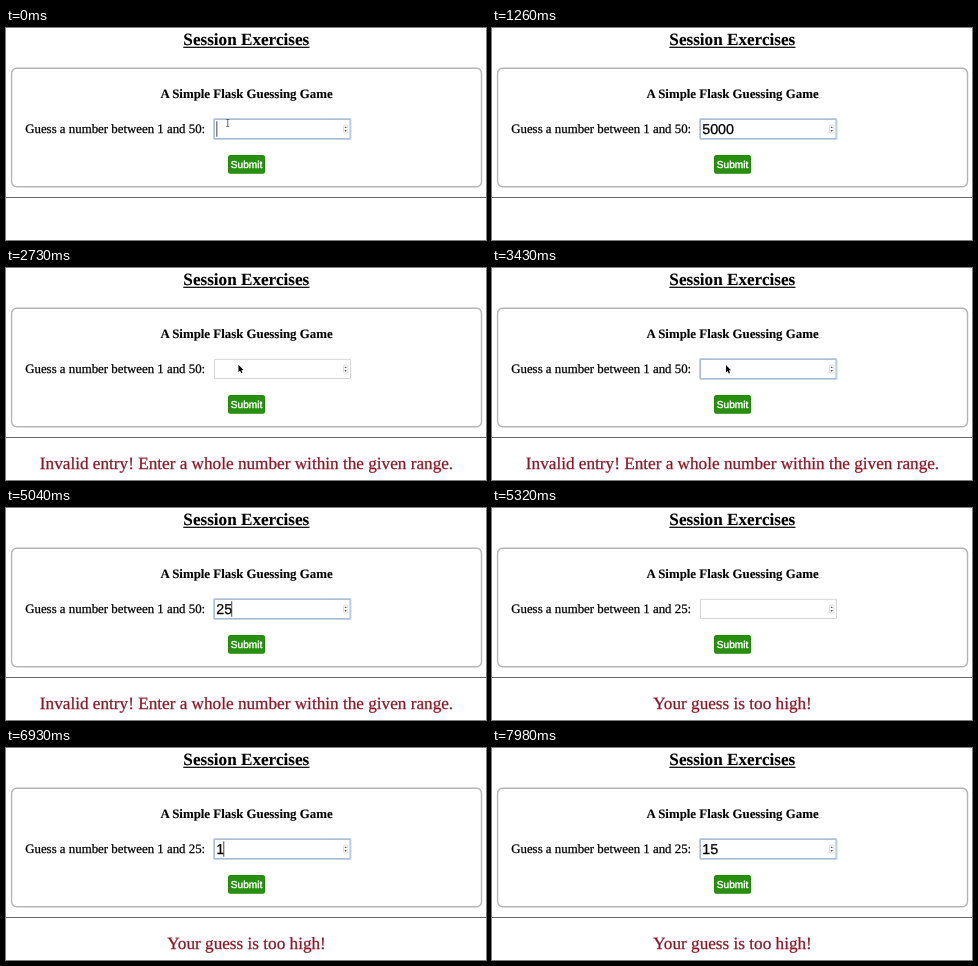
An HTML page with a canvas that plays this animation: 480 by 212 pixels, repeating every 8000 ms.

```html
<!DOCTYPE html>
<html lang="en">
<head>
<meta charset="utf-8">
<title>Guessing game</title>
<style>
html, body { margin: 0; width: 100%; height: 100%; overflow: hidden; background: #fff; }
canvas { display: block; width: 480px; height: 212px; }
</style>
</head>
<body>
<canvas id="stage"></canvas>
<script>
const LOOP = 8000;
const SERIF = '"Liberation Serif", "Times New Roman", serif';
const SANS = '"Liberation Sans", Arial, sans-serif';
const canvas = document.getElementById('stage');
const ctx = canvas.getContext('2d');
const ratio = window.devicePixelRatio || 1;
canvas.width = 480 * ratio;
canvas.height = 212 * ratio;
ctx.scale(ratio, ratio);
ctx.textRendering = 'geometricPrecision';
ctx.lineJoin = 'round';

// [start time, value]: the last entry already reached is in force
const typed = [[0, ''], [490, '5'], [700, '50'], [840, '500'], [980, '5000'], [1540, ''],
  [4620, '2'], [4830, '25'], [5320, ''], [6930, '1'], [7210, '15']];
const focus = [[0, 1], [1540, 0], [3360, 1], [5320, 0], [6440, 1]];
const caret = [[0, 1], [1050, 0], [3710, 1], [4200, 0], [4620, 1], [5320, 0],
  [6580, 1], [7140, 0], [7210, 1], [7770, 0]];
const message = [[0, ''], [1540, 'Invalid entry! Enter a whole number within the given range.'],
  [5320, 'Your guess is too high!']];
const limit = [[0, 50], [5320, 25]];
const pointer = [[0, 'beam'], [490, ''], [2240, 'arrow'], [3710, 'beam'], [4620, ''],
  [5810, 'arrow'], [6580, 'beam'], [6930, '']];

function at(track, t) {
  let value = track[0][1];
  for (const [start, v] of track) if (t >= start) value = v;
  return value;
}

// a hairline outline gives the letters a slightly heavier weight
function text(str, x, y, font, color, align = 'center', weight = 0.25) {
  ctx.font = font;
  ctx.fillStyle = ctx.strokeStyle = color;
  ctx.textAlign = align;
  ctx.lineWidth = weight;
  ctx.fillText(str, x, y);
  ctx.strokeText(str, x, y);
}

function box(x, y, w, h, r, stroke, fill, width = 1) {
  ctx.beginPath();
  ctx.roundRect(x, y, w, h, r);
  if (fill) { ctx.fillStyle = fill; ctx.fill(); }
  if (stroke) { ctx.strokeStyle = stroke; ctx.lineWidth = width; ctx.stroke(); }
}

function poly(points, color) {
  ctx.beginPath();
  points.forEach(([x, y]) => ctx.lineTo(x, y));
  ctx.closePath();
  ctx.fillStyle = color;
  ctx.fill();
}

function drawPage(t) {
  ctx.fillStyle = '#fff';
  ctx.fillRect(0, 0, 480, 212);
  text('Session Exercises', 240.3, 17, `bold 17.15px ${SERIF}`, '#000', 'center', 0.1);
  ctx.fillRect(177.3, 18.7, 126.2, 1.2);
  box(5.6, 40.3, 469.9, 118.5, 5, '#b4b4b4', null, 1.4);
  text('A Simple Flask Guessing Game', 240.5, 70.2, `bold 12.87px ${SERIF}`, '#000', 'center', 0.1);
  text(`Guess a number between 1 and ${at(limit, t)}:`, 19.2, 105.2, `12.87px ${SERIF}`, '#000', 'left');
  box(222, 127, 37, 18.7, 2.5, null, '#1f7d08');
  box(222.6, 127.6, 35.8, 17.5, 2, null, '#28900f');
  text('Submit', 240.5, 139.8, `10.1px ${SANS}`, '#fff', 'center', 0.4);
  ctx.fillStyle = '#666';
  ctx.fillRect(0, 169, 480, 1);
  text(at(message, t), 240.5, 201.3, `17.2px ${SERIF}`, '#8c1526');
}

function drawField(t) {
  if (at(focus, t)) {
    box(207.5, 90.5, 137.5, 21, 1, 'rgba(135,175,210,0.55)');
    box(208.5, 91.5, 135.5, 19, 0, 'rgba(125,155,185,0.65)');
  } else {
    box(208.5, 91.3, 136, 19.2, 0, '#d6d6d6');
  }
  box(337.4, 96.9, 4.4, 8.4, 1.8, '#ddd', '#fff');
  poly([[338.4, 100.1], [339.6, 98.2], [340.8, 100.1]], '#666');
  poly([[338.4, 102.1], [339.6, 104], [340.8, 102.1]], '#666');

  const value = at(typed, t);
  text(value, 210.2, 105.6, `14.3px ${SANS}`, '#000', 'left');
  if (at(caret, t)) {
    const x = 210.4 + (value ? ctx.measureText(value).width - 1 : 0);
    ctx.fillStyle = '#333';
    ctx.fillRect(x, 93.3, 0.9, 15.4);
  }
}

function drawPointer(t) {
  const kind = at(pointer, t);
  if (!kind) return;
  // the mouse glides once, then rests
  const p = Math.min(1, Math.max(0, (t - 2240) / 630));
  const ease = p * p * (3 - 2 * p);
  const x = 221.8 + 12.2 * ease;
  const y = 95 + 2 * ease;
  if (kind === 'beam') {
    ctx.fillStyle = '#444';
    ctx.fillRect(x - 0.4, y - 3.5, 0.8, 7);
    ctx.fillRect(x - 1.6, y - 4, 3.2, 0.7);
    ctx.fillRect(x - 1.6, y + 3.3, 3.2, 0.7);
  } else {
    const shape = [[0, 0], [0, 7.3], [1.6, 5.9], [2.8, 8.6], [4, 8], [2.9, 5.5], [5, 5.3]];
    poly(shape.map(([dx, dy]) => [x + dx, y + dy]), '#000');
  }
}

function frame(now) {
  const t = now % LOOP;
  drawPage(t);
  drawField(t);
  drawPointer(t);
  requestAnimationFrame(frame);
}
frame(0);
</script>
</body>
</html>
```
